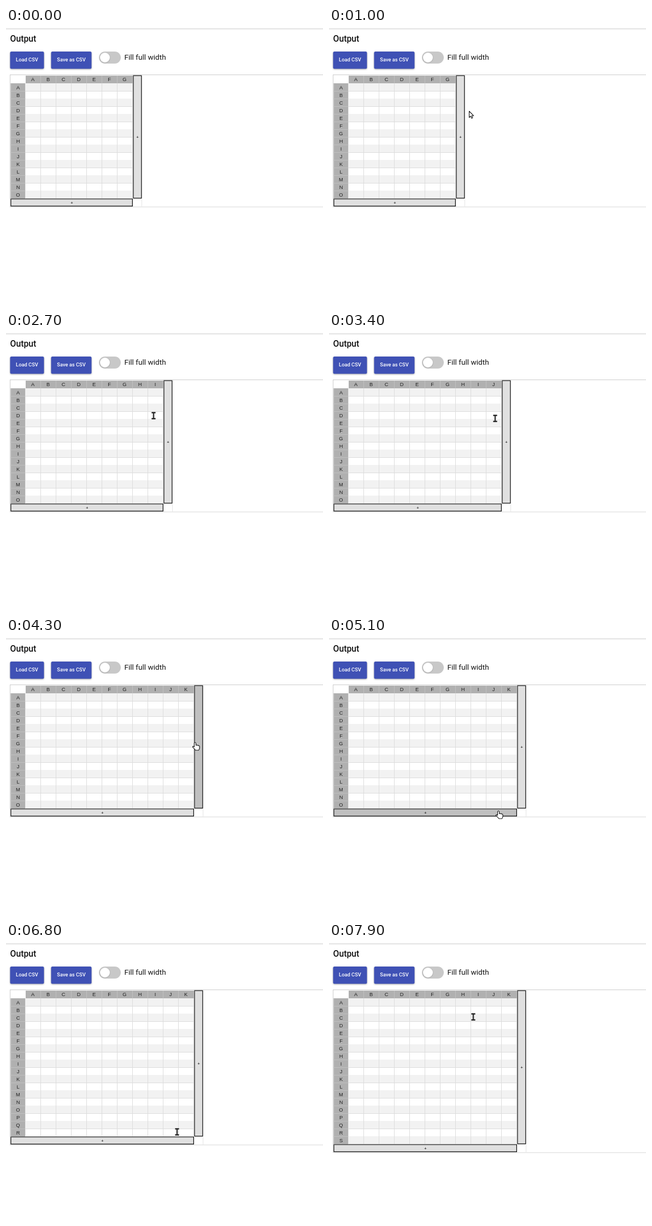
Write an HTML page with a canvas that moves like this. It is 580 by 506 pixels and loops after 8 s.

```html
<!DOCTYPE html>
<html lang="en">
<head>
<meta charset="utf-8">
<title>Output table</title>
<style>
html, body { margin: 0; width: 580px; height: 506px; overflow: hidden; background: #fff; }
canvas { display: block; }
</style>
</head>
<body>
<canvas id="stage" width="580" height="506"></canvas>
<script>
const ctx = document.getElementById('stage').getContext('2d');
const LOOP = 8000, STEP = 100;
const X0 = 36, Y0 = 101, CW = 28, RH = 14;
const SMALL = '9.33px "Liberation Sans", Arial, sans-serif';

// Moments at which a column or row is appended
const colClicks = [1800, 2700, 3300, 4000];
const rowClicks = [5400, 6100, 6600, 7300];

// Resting points of the pointer (time, x, y), eased in between
const stops = [
  [100, 575, 280], [1100, 247, 148], [1700, 244, 134], [2200, 257, 146],
  [2700, 270, 151], [3300, 303, 155], [4000, 328, 176], [4300, 346, 191],
  [5200, 309, 320], [5600, 309, 322], [6000, 312, 333], [6800, 313, 345],
  [7100, 313, 359], [7300, 313, 359], [7900, 264, 135]
];

const passed = (times, t) => times.filter(c => c <= t).length;
const letter = i => String.fromCharCode(65 + i);
const ease = u => u * u * (3 - 2 * u);

function rect(x, y, w, h, color) {
  ctx.fillStyle = color;
  ctx.fillRect(x, y, w, h);
}

function text(s, x, y, font, color, align = 'left') {
  ctx.font = font;
  ctx.textAlign = align;
  ctx.fillStyle = color;
  ctx.fillText(s, x, y);
}

function pill(x, y, w, h, r, color) {
  ctx.beginPath();
  ctx.roundRect(x, y, w, h, r);
  ctx.fillStyle = color;
  ctx.fill();
}

function withShadow(alpha, blur, dy, paint) {
  ctx.save();
  ctx.shadowColor = `rgba(0,0,0,${alpha})`;
  ctx.shadowBlur = blur;
  ctx.shadowOffsetY = dy;
  paint();
  ctx.restore();
}

function button(x, w, label) {
  withShadow(0.35, 3, 1, () => pill(x, 43, w, 31.5, 2.5, '#3f51b5'));
  text(label, x + w / 2, 61.3, '500 9.33px Roboto, sans-serif', '#fff', 'center');
}

function drawHeader() {
  rect(0, 0, 580, 3, '#ebebeb');
  text('Output', 7.5, 25.3, '500 15.8px Roboto, sans-serif', '#111');
  button(7.5, 62, 'Load CSV');
  button(82.5, 74, 'Save as CSV');
  pill(170, 43, 40, 22, 11, '#c8c8c8');
  withShadow(0.25, 2, 0.5, () => pill(172, 45, 18, 18, 9, '#fff'));
  text('Fill full width', 216.5, 58.3, '400 13.6px Roboto, sans-serif', '#111');
}

function bar(x, y, w, h, hover) {
  const edge = 1.33;
  rect(x, y, w, h, '#111');
  rect(x, y, w - edge, h - edge, '#4c4c4c');
  rect(x + edge, y + edge, w - 2 * edge, h - 2 * edge, hover ? '#c0c0c0' : '#e0e0e0');
  text('+', x + w / 2, y + h / 2 + 2.7, '8px "Liberation Sans", Arial, sans-serif', '#000', 'center');
}

function drawTable(cols, rows, right, bottom, over) {
  const head = '#b0b0b0', line = '#dcdcdc', split = '#c0c0c0';
  rect(7, 85, 573, 1, '#cccccc');
  rect(7, 85, 1, bottom - 69, '#cccccc');
  rect(7, bottom + 15.4, 573, 1, '#d8d8d8');
  rect(right + 16, bottom + 2, 1, 13, '#e4e4e4');

  rect(X0, 87, cols * CW, 14, head);
  rect(8.5, Y0, 26.8, rows * RH, head);
  for (let r = 0; r < rows; r++) {
    const y = Y0 + r * RH;
    if (r % 2 === 0) rect(X0, y, cols * CW, RH, '#f2f2f2');
    rect(X0, y + RH, cols * CW, 1, line);
    rect(8.5, y + RH, 26.8, 1, split);
    text(letter(r), 22, y + 11, SMALL, '#222', 'center');
  }
  for (let c = 0; c < cols; c++) {
    const x = X0 + c * CW;
    rect(x + CW - 1, Y0, 1, rows * RH, line);
    rect(x + CW - 1, 87, 1, 14, split);
    text(letter(c), x + 13, 97, SMALL, '#222', 'center');
  }
  bar(right + 0.5, 86.5, 16, bottom - 86, over === 'right');
  bar(8.5, bottom + 0.8, right - 8.5, 14.2, over === 'bottom');
}

function pointer(t) {
  if (t < stops[0][0]) return null;
  const i = Math.max(1, stops.findIndex(s => s[0] >= t));
  const [t0, x0, y0] = stops[i - 1], [t1, x1, y1] = stops[i];
  const k = ease((t - t0) / (t1 - t0));
  return { x: x0 + (x1 - x0) * k, y: y0 + (y1 - y0) * k };
}

function areaAt(p, right, bottom) {
  if (!p || p.x > right + 17 || p.y > bottom + 15) return '';
  if (p.x > right) return p.y < bottom ? 'right' : '';
  return p.y > bottom + 1 ? 'bottom' : 'cell';
}

function shape(d) {
  const s = new Path2D(d);
  ctx.lineWidth = 1.1;
  ctx.lineJoin = 'round';
  ctx.fillStyle = '#fff';
  ctx.strokeStyle = '#111';
  ctx.fill(s);
  ctx.stroke(s);
}

function drawPointer(p, kind) {
  ctx.save();
  ctx.translate(Math.round(p.x), Math.round(p.y));
  if (kind === 'text') {
    const beam = new Path2D('M-3.5 -5.5H3.5M-3.5 5.5H3.5M0 -5.5V5.5');
    ctx.lineWidth = 3;
    ctx.strokeStyle = '#8a8a8a';
    ctx.stroke(beam);
    ctx.lineWidth = 1.3;
    ctx.strokeStyle = '#111';
    ctx.stroke(beam);
  } else if (kind === 'hand') {
    shape('M-1.5 8V1Q0 -1.5 1.5 1V5Q3 3.8 4 5.2Q5.5 4.2 6.3 5.8Q8 5.2 8 7.2V10Q8 12 6.5 14H.8Q-.5 12 -4.3 8.7Q-5 7 -3.4 6.7Z');
  } else {
    shape('M.5 0V11.5L3.2 9L5 13L6.9 12.1L5.1 8.3H8.7Z');
  }
  ctx.restore();
}

function draw(t) {
  const cols = 7 + passed(colClicks, t);
  const rows = 15 + passed(rowClicks, t);
  const right = X0 + cols * CW, bottom = Y0 + rows * RH;
  const p = pointer(t);
  const over = areaAt(p, right, bottom);
  rect(0, 0, 580, 506, '#fff');
  drawHeader();
  drawTable(cols, rows, right, bottom, over);
  if (!p) return;
  // The arrow lingers briefly at the bar's upper edge
  const entering = over === 'bottom' && p.y < bottom + 4;
  const kind = over === 'cell' ? 'text' : over && !entering ? 'hand' : 'arrow';
  drawPointer(p, kind);
}

const start = performance.now();
function tick() {
  const t = (performance.now() - start) % LOOP;
  draw(Math.floor(t / STEP) * STEP);
  requestAnimationFrame(tick);
}
tick();
</script>
</body>
</html>
```
